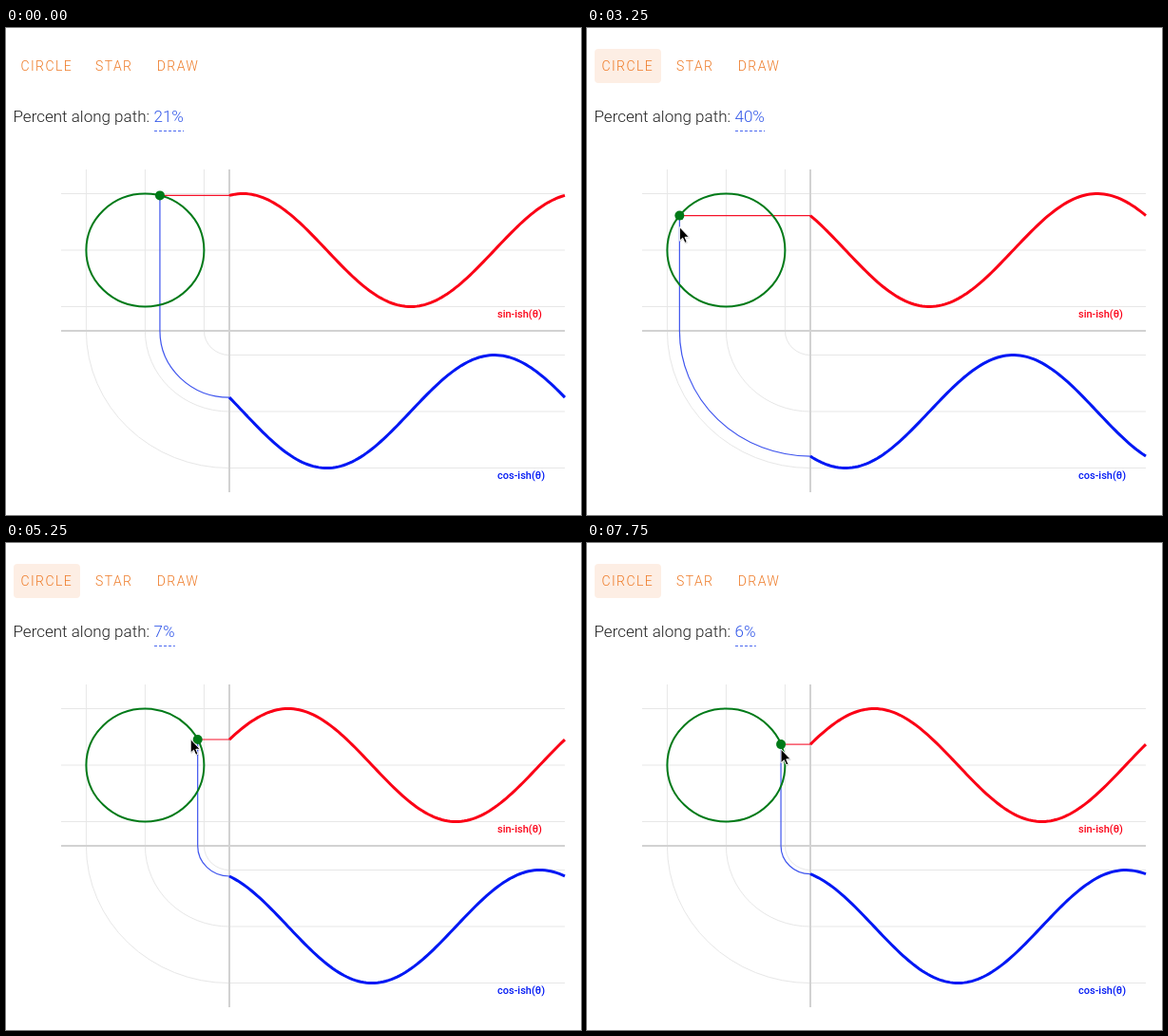
An HTML page for the animation above (8000 ms loop, 605x513 px).

```html
<!DOCTYPE html>
<html lang="en">
<head>
<meta charset="utf-8">
<title>Percent along path</title>
<style>
  html, body { margin: 0; width: 100%; height: 100%; overflow: hidden; background: #fff; }
  svg { display: block; font-family: Roboto, sans-serif; }
  .menu { font-size: 14px; font-weight: 300; letter-spacing: 1.4px; fill: #ee7a26; }
  .line { font-size: 17px; font-weight: 300; fill: #222; }
  .label { font-size: 11px; font-weight: 500; }
  path, ellipse { fill: none; }
</style>
</head>
<body>
<svg width="605" height="513" viewBox="0 0 605 513">
  <rect id="hover" x="8" y="22" width="70" height="36" rx="4" fill="#fdeee4"/>
  <g class="menu">
    <text x="15.5" y="45">CIRCLE</text>
    <text x="94" y="45">STAR</text>
    <text x="158.8" y="45">DRAW</text>
  </g>
  <g class="line">
    <text x="7.5" y="99">Percent along path:</text>
    <text id="percent" x="155.5" y="99" fill="#2f55e8"></text>
  </g>
  <path id="dash" stroke="#4a68f0" stroke-dasharray="3 2"/>
  <path id="guides" stroke="#e7e7e7"/>
  <path d="M58 319H588M235 149V489" stroke="#d2d2d2" stroke-width="2"/>
  <path id="toSin" stroke="#f5122a" stroke-width="1.1"/>
  <path id="toCos" stroke="#3f55ee" stroke-width="1.2"/>
  <path id="sin" stroke="#fb0016" stroke-width="3"/>
  <path id="cos" stroke="#0018f4" stroke-width="3"/>
  <text class="label" x="517" y="305" fill="#fb0016">sin-ish(θ)</text>
  <text class="label" x="517" y="475" fill="#0018f4">cos-ish(θ)</text>
  <ellipse id="ring" stroke="#007a18" stroke-width="2"/>
  <circle id="dot" r="5" fill="#007a18"/>
  <g id="cursor">
    <path d="M0 0V14.6L3.3 11.6 5.6 16.8 7.9 15.8 5.7 10.7H10.2Z" transform="translate(.6 1.2)" style="fill:#000" opacity=".18"/>
    <path d="M0 0V14.6L3.3 11.6 5.6 16.8 7.9 15.8 5.7 10.7H10.2Z" style="fill:#000" stroke="#fff"/>
  </g>
</svg>
<script>
const LOOP = 8000, STEP = 250, TAU = Math.PI * 2;
const CX = 146.4, CY = 234, RX = 62, RY = 59.5;   // ring
const AX = 235, AY = 319, END = 588;              // axes
const SQUASH = RY / RX;

// time, position along the ring in turns, pointer offset from the dot
const KEYS = [
  [250, .2097, 171, -80],
  [500, .2097, 20, -115],
  [750, .2097, -114, -131],
  [1000, .2097, -60, -55],
  [1250, .2097, -2, 1.5],
  [1500, .212, -3, 1.5],
  [2000, .229, -6, 1.5],
  [2250, .2435, -7, 1.5],
  [2500, .279, -2, 7],
  [3250, .3952, 0, 12],
  [3750, .535, 1, 7],
  [4000, .6045, 1.5, 4.5],
  [5000, 1, -6, 1],
  [5250, 1.0748, -7.5, -.5],
  [6250, 1.231, -5, .5],
  [6500, 1.2365, -5, .5],
  [7000, 1.212, -4, 1.5],
  [7750, 1.06, 0, 5]
];

const el = id => document.getElementById(id);
const set = (id, attrs) => {
  for (const k in attrs) el(id).setAttribute(k, attrs[k]);
};

function sample(t) {
  const i = KEYS.findIndex(k => k[0] >= t);
  if (i < 0) return KEYS[KEYS.length - 1];
  if (i === 0) return KEYS[0];
  const a = KEYS[i - 1], b = KEYS[i], f = (t - a[0]) / (b[0] - a[0]);
  return a.map((v, j) => v + (b[j] - v) * f);
}

// Drop from (x, y) to the horizontal axis, then swing round to the vertical one
function swing(x, y) {
  const r = AX - x, ry = r * SQUASH;
  return `M${x} ${y}V${AY}A${r} ${ry} 0 0 0 ${AX} ${AY + ry}`;
}

function wave(fn, mid, p) {
  const pts = [];
  for (let i = 0; i <= 120; i++) {
    const u = i / 120;
    pts.push((AX + (END - AX) * u).toFixed(2) + " " + (mid - RY * fn(TAU * (p + u))).toFixed(2));
  }
  return "M" + pts.join("L");
}

const COS_MID = AY + (AX - CX) * SQUASH;

function drawStatic() {
  let d = "";
  for (const s of [-1, 0, 1]) {
    const x = CX + s * RX;
    d += `M58 ${CY + s * RY}H${END}` + swing(x, 149) + `H${END}`;
  }
  set("guides", { d });
  set("ring", { cx: CX, cy: CY, rx: RX, ry: RY });
}

function draw(t) {
  const [, p, dx, dy] = sample(t);
  const x = CX + RX * Math.cos(TAU * p), y = CY - RY * Math.sin(TAU * p);
  const text = Math.round(p * 100) % 100 + "%";
  el("percent").textContent = text;
  set("dash", { d: `M156 108.5H${156 + 3.2 + 9.3 * text.length}` });
  set("toSin", { d: `M${x} ${y}H${AX}` });
  set("toCos", { d: swing(x, y) });
  set("sin", { d: wave(Math.sin, CY, p) });
  set("cos", { d: wave(Math.cos, COS_MID, p) });
  set("dot", { cx: x, cy: y });
  set("cursor", {
    transform: `translate(${x + dx} ${y + dy})`,
    visibility: t >= 250 ? "visible" : "hidden"
  });
  set("hover", { visibility: t >= 750 ? "visible" : "hidden" });
}

const start = performance.now();
function tick() {
  const t = (performance.now() - start) % LOOP;
  draw(Math.floor(t / STEP) * STEP);
  requestAnimationFrame(tick);
}
drawStatic();
tick();
</script>
</body>
</html>
```
